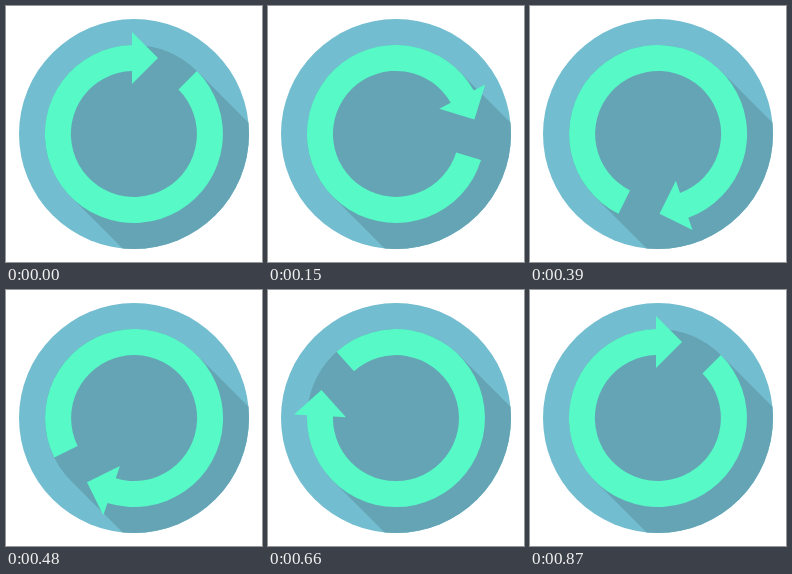
Recreate the animation shown at these times as an HTML page. Size 256x256 px, loop 0.9 s.

```html
<!DOCTYPE html>
<html lang="en">
<head>
<meta charset="utf-8">
<title>Refresh</title>
<style>
  html, body { margin: 0; height: 100%; overflow: hidden; background: #fff; }
  svg { display: block; width: 100vw; height: 100vh; }
</style>
</head>
<body>
<svg viewBox="0 0 256 256">
  <clipPath id="disc"><circle cx="128" cy="128" r="115"/></clipPath>
  <circle cx="128" cy="128" r="115" fill="#72bdcf"/>
  <!-- long diagonal shadow -->
  <path d="M128 128L300 300" stroke="#64a4b4" stroke-width="178" stroke-linecap="round" clip-path="url(#disc)"/>
  <path id="arrow" fill="#57f9c6"
    d="M126 26L152 52L126 78V65A63 63 0 1 0 172.5 83.5L190.9 65.1A89 89 0 1 1 126 39Z"/>
</svg>
<script>
  const LOOP = 900, STEP = 30, TURN_STEPS = 29;
  const arrow = document.getElementById('arrow');

  // One full turn in 29 even steps; the last pose equals the first.
  function draw() {
    const step = Math.floor(performance.now() % LOOP / STEP);
    arrow.setAttribute('transform', `rotate(${step * 360 / TURN_STEPS} 128 128)`);
    requestAnimationFrame(draw);
  }
  draw();
</script>
</body>
</html>
```
